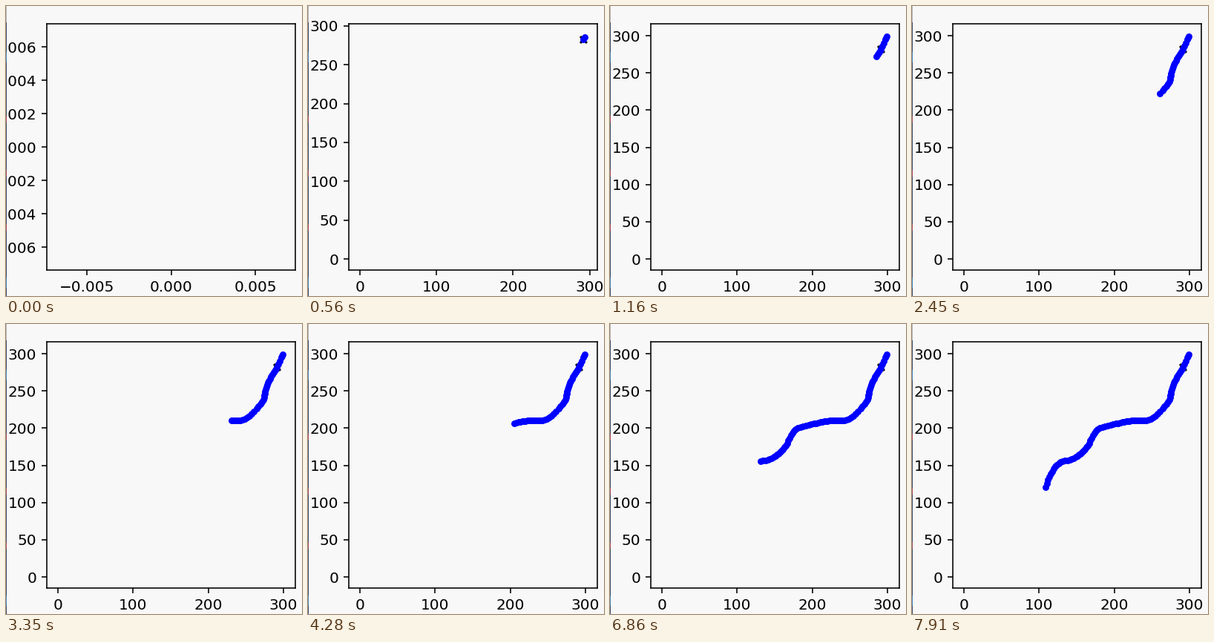
These frames come from a looping animation (399x391 px, 8 s). A matplotlib script:

```python
import numpy as np
import matplotlib.pyplot as plt
from matplotlib.animation import FuncAnimation
from matplotlib.patches import Rectangle

W, H, DPI = 399, 391, 144
LOOP, STEP = 8000, 20
BG = "#f8f8f8"
LEFT, RIGHT, TOP, BOTTOM = 55, 390, 24.2, 356.2
PAD = np.array([2.0, 2.2])        # room kept beyond the furthest dot
START, PEAK = np.array([291.8, 282.5]), np.array([299, 298.6])
CLIMB, DESCENT = 6, 81            # dots in each part

# Stage positions the descent passes, evenly spaced in dot number
KEYS = np.array([(364.6, 58.8), (351.6, 82.3), (345.1, 104.8), (321.8, 127.8),
                 (298.6, 129.9), (278.1, 133.7), (250.4, 142), (235, 166.3),
                 (218.1, 180.8), (195.1, 189.8), (180.1, 219.8)])

plt.rcParams["font.family"] = "DejaVu Sans"


def to_data(px):
    """Stage pixels to data units under the final axis limits."""
    frac = (px - (LEFT, BOTTOM)) * (1, -1) / (RIGHT - LEFT, BOTTOM - TOP)
    return (frac * 1.1 - 0.05) * (PEAK + PAD)


def smooth(keys, n):
    """n points on a Hermite curve through evenly timed keys."""
    slope = np.gradient(keys, axis=0, edge_order=2)
    at = np.linspace(0, len(keys) - 1, n)
    k = np.minimum(at.astype(int), len(keys) - 2)
    u = (at - k)[:, None]
    ease = u * u * (3 - 2 * u)
    return (keys[k] + (keys[k + 1] - keys[k]) * ease
            + slope[k] * u * (1 - u) ** 2 - slope[k + 1] * u * u * (1 - u))


def on_clock(ms):
    """Snap times to the 30 ms clock that starts at 500 ms."""
    return 500 + 30 * np.round((ms - 500) / 30)


u = np.linspace(0, 1, CLIMB)[:, None] ** 0.75
climb = START + (PEAK - START) * u * u * (3 - 2 * u)
points = np.concatenate([climb, to_data(smooth(KEYS, DESCENT))])

# The pace of the descent drifts a little
pace = np.interp(range(DESCENT), [0, 16, 44, 64, 80], [920, 2090, 4610, 6320, 7910])
times = on_clock(np.concatenate([np.linspace(500, 850, CLIMB), pace]))

fig = plt.figure(figsize=(W / DPI, H / DPI), dpi=DPI, facecolor=BG)
ax = fig.add_axes([LEFT / W, 1 - BOTTOM / H, (RIGHT - LEFT) / W, (BOTTOM - TOP) / H],
                  facecolor=BG)
cross = ax.scatter(*START, s=20, c="k", marker="x", zorder=2)
dots = ax.scatter([], [], s=20, c="b", lw=0, zorder=3)


def edge_band(top, height, color):
    """Part of the one-pixel sliver of backdrop on the left."""
    fig.add_artist(Rectangle((0, 1 - (top + height) / H), 1 / W, height / H,
                             fc=color, lw=0, zorder=9))


edge_band(0, H, "#3c4c68")
edge_band(0, 22, "#b4b4b8")
for y in (62, 366):
    edge_band(y, 14, "#3f82b8")
for y in range(148, 300, 73):
    edge_band(y, 9, "#a84a58")


def draw(i):
    n = np.searchsorted(times, i * STEP + STEP / 2, side="right")
    cross.set_visible(n > 0)
    dots.set_offsets(points[:n])
    if n:
        mx, my = points[:n].max(axis=0) + PAD
        ax.set(xlim=(-0.05 * mx, 1.05 * mx), ylim=(-0.05 * my, 1.05 * my))
    else:
        ax.set(xlim=(-0.00737, 0.00737), ylim=(-0.00738, 0.00738))
    return cross, dots


anim = FuncAnimation(fig, draw, frames=LOOP // STEP, interval=STEP,
                     repeat=True, repeat_delay=0, init_func=lambda: draw(0))
plt.show()
```
